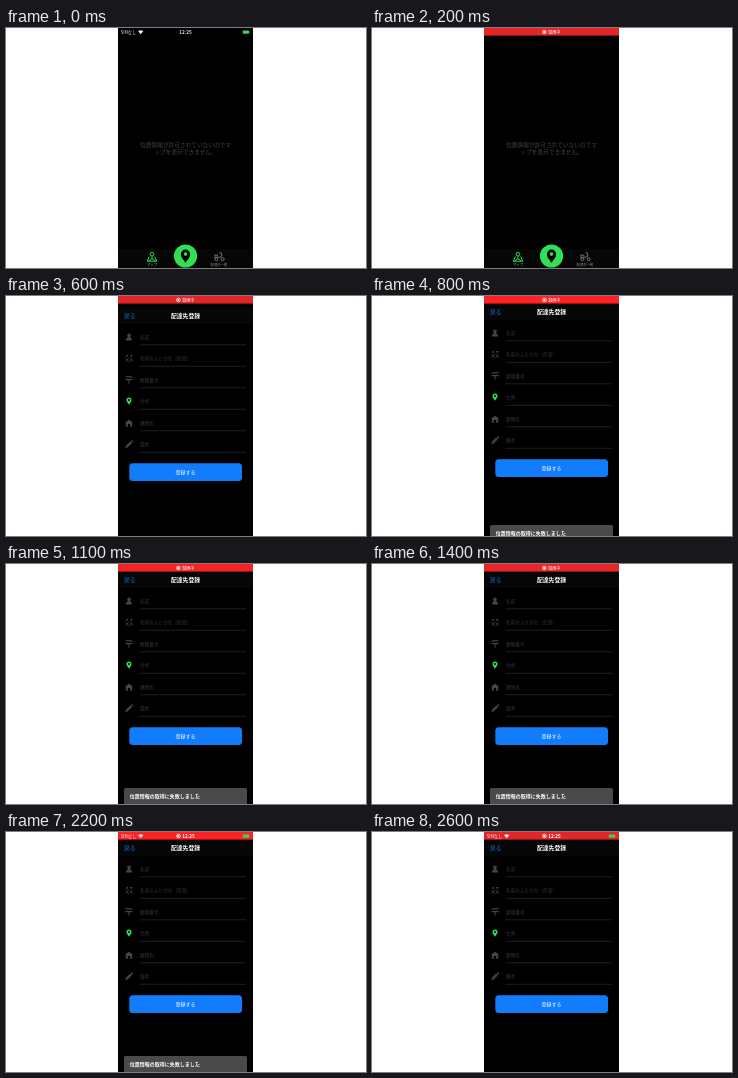
Animation of 360x240 px, one loop 2.7 s. Source, as an HTML page:

```html
<!DOCTYPE html>
<html lang="ja">
<head>
<meta charset="utf-8">
<style>
html, body { margin: 0; width: 100%; height: 100%; overflow: hidden; background: #fff; }
svg { display: block; width: 360px; height: 240px; font-family: "Noto Sans CJK JP", "Noto Sans CJK", "Noto Sans", sans-serif; }
.mid { text-anchor: middle; }
.bold { font-weight: 700; }
</style>
</head>
<body>
<svg viewBox="0 0 360 240">
  <defs>
    <clipPath id="screen"><rect x="112" width="135" height="240"/></clipPath>
    <path id="pin" fill-rule="evenodd" d="M0 7C-1.2 4.6-4.6 2-4.6-1.6a4.6 4.6 0 0 1 9.2 0C4.6 2 1.2 4.6 0 7ZM-1.8-1.7a1.8 1.8 0 0 0 3.6 0a1.8 1.8 0 0 0-3.6 0Z"/>
    <g id="sides">
      <text x="114.7" y="5.7" font-size="4.2" fill="#e8e8e8">SIMなし</text>
      <path fill="#e8e8e8" d="M134.7 6.2l-2.6-2.9q2.6-2.1 5.2 0Z"/>
      <rect x="236.7" y="2.4" width="6.4" height="3.4" rx="1" fill="#35d653"/>
      <path d="M243.6 3.4v1.4" stroke="#35d653" stroke-width=".5"/>
    </g>
  </defs>
  <g clip-path="url(#screen)">
    <rect x="112" width="135" height="240"/>

    <g id="map">
      <g class="mid" font-size="5.7" fill="#424242">
        <text x="179.6" y="118.6">位置情報が許可されていないのでマ</text>
        <text x="179.6" y="126">ップを表示できません。</text>
      </g>
      <rect x="112" y="221" width="135" height="19" fill="#060606"/>
      <g fill="none" stroke="#2fd653" stroke-width="1">
        <circle cx="146" cy="226.2" r="1.8"/>
        <path d="M146 228v3M143.4 228.6l-2.2 4.6h9.6l-2.2-4.6M142.5 233l3.5-2.4 3.5 2.4"/>
      </g>
      <g class="mid" font-size="3.4">
        <text x="146" y="238.2" fill="#2fd653">マップ</text>
        <text x="213" y="238.2" fill="#8a8a8a">配達先一覧</text>
      </g>
      <g fill="none" stroke="#777" stroke-width="1">
        <circle cx="210.4" cy="231.2" r="1.5"/><circle cx="216.6" cy="231.2" r="1.5"/>
        <path d="M208 229.2h6l2-1.2-.9-3.2h-1.6M208.2 227.2h4"/>
      </g>
      <circle cx="179.5" cy="228" r="11.6" fill="#30df52"/>
      <use href="#pin" x="179.5" y="227.8"/>
    </g>

    <g id="form">
      <rect x="112" width="135" height="250"/>
      <rect x="112" y="7.5" width="135" height="16.5" fill="#060606"/>
      <text x="118" y="17.7" font-size="5.7" fill="#1767d8">戻る</text>
      <text x="179.5" y="17.8" font-size="5.8" fill="#fff" class="mid bold">配達先登録</text>
      <g id="rows"></g>
      <g fill="#444">
        <path d="M123 33.5a1.8 1.8 0 0 1 1.8 1.8c0 1-.4 1.7-.9 2.1 1.4.3 2.2 1.1 2.2 3.1h-6.2c0-2 .8-2.8 2.2-3.1-.5-.4-.9-1.1-.9-2.1a1.8 1.8 0 0 1 1.8-1.8Z"/>
        <path d="M119.5 56.5l2-1.5M121.5 55v2M120 58l2.6 3.6M122.6 58l-2.8 3.8M124 55.5h2.5M125.2 55v3M123.8 58.8l3 2.8M126.5 58.5l-2.6 3.2" stroke="#444" stroke-width=".8"/>
        <path d="M119.5 76.2h7v1.3h-7ZM119.5 79h7v1.3h-3v3.4h-1v-3.4h-3Z"/>
        <path d="M123 119.4l4 3.3h-.8v4h-2.1v-2.6h-2.2v2.6h-2.1v-4h-.8Z"/>
        <path d="M119.3 148.1l.6-2.3 4.3-4.3 1.7 1.7-4.3 4.3ZM124.7 141l.7-.7q.4-.3.8 0l.9.9q.3.4 0 .8l-.7.7Z"/>
      </g>
      <use href="#pin" fill="#30df52" transform="translate(123 101) scale(.55)"/>
      <rect x="123.3" y="163.3" width="112.7" height="17.7" rx="3.5" fill="#127dfc"/>
      <text x="179.5" y="174.2" font-size="5" fill="#fff" class="mid">登録する</text>
    </g>

    <g id="toast">
      <rect x="118" y="224" width="123" height="20" rx="1.5" fill="#4a4a4a"/>
      <text x="123.7" y="233.8" font-size="5.03" fill="#fff" class="bold">位置情報の取得に失敗しました</text>
    </g>

    <g id="idleBar">
      <use href="#sides"/>
      <text x="179.5" y="5.8" font-size="4.7" fill="#e8e8e8" class="mid bold">12:25</text>
    </g>
    <g id="recBar">
      <rect id="red" x="112" width="135" height="7.6"/>
      <circle cx="172.4" cy="4" r="1.9" fill="none" stroke="#fff" stroke-width=".7"/>
      <circle cx="172.4" cy="4" r="1" fill="#fff"/>
      <text id="recText" x="176.2" y="5.6" font-size="4.1" fill="#fff">録画中</text>
      <text id="recTime" x="176.2" y="5.7" font-size="4.7" fill="#fff" class="bold">12:25</text>
      <use id="recSides" href="#sides"/>
    </g>
  </g>
</svg>
<script>
const LOOP = 2700, STEP = 100;
const el = id => document.getElementById(id);
const show = (id, on) => el(id).setAttribute("visibility", on ? "visible" : "hidden");
const moveY = (id, y) => el(id).setAttribute("transform", `translate(0 ${y})`);

// Linear interpolation through [time, value] points, held at both ends.
function track(t, points) {
  let [t0, v0] = points[0];
  if (t <= t0) return v0;
  for (const [t1, v1] of points.slice(1)) {
    if (t < t1) return v0 + (v1 - v0) * (t - t0) / (t1 - t0);
    [t0, v0] = [t1, v1];
  }
  return v0;
}

el("rows").innerHTML = ["名前", "名前のふりがな（任意）", "郵便番号", "住所", "建物名", "備考"]
  .map((label, i) => {
    const y = 37 + 21.5 * i;
    return `<text x="134" y="${y + 1.7}" font-size="4.65" fill="#363636">${label}</text>
      <path d="M133.5 ${y + 7.8}H240" stroke="#2c2c2c" stroke-width=".7"/>`;
  }).join("");

function draw(now) {
  const t = Math.floor(now % LOOP / STEP) * STEP;
  const recording = t >= 200, clock = t >= 2000;
  show("idleBar", !recording);
  show("recBar", recording);
  show("recText", recording && !clock);
  show("recTime", clock);
  show("recSides", clock);

  const glow = track(t, [[600, 0], [800, 1], [1400, .25], [1800, .25], [2200, 1], [2400, 0]]);
  el("red").setAttribute("fill", `rgb(${226 + 29 * glow},${38 - 4 * glow},${40 - 4 * glow})`);

  moveY("form", track(t, [[400, 250], [500, 45], [600, 4], [700, 0]]));
  moveY("toast", track(t, [[600, 20], [700, 14], [800, 5], [900, 1], [1000, 0], [2200, 0], [2300, 6], [2400, 20]]));
  requestAnimationFrame(() => draw(performance.now() - start));
}
const start = performance.now();
draw(0);
</script>
</body>
</html>
```
